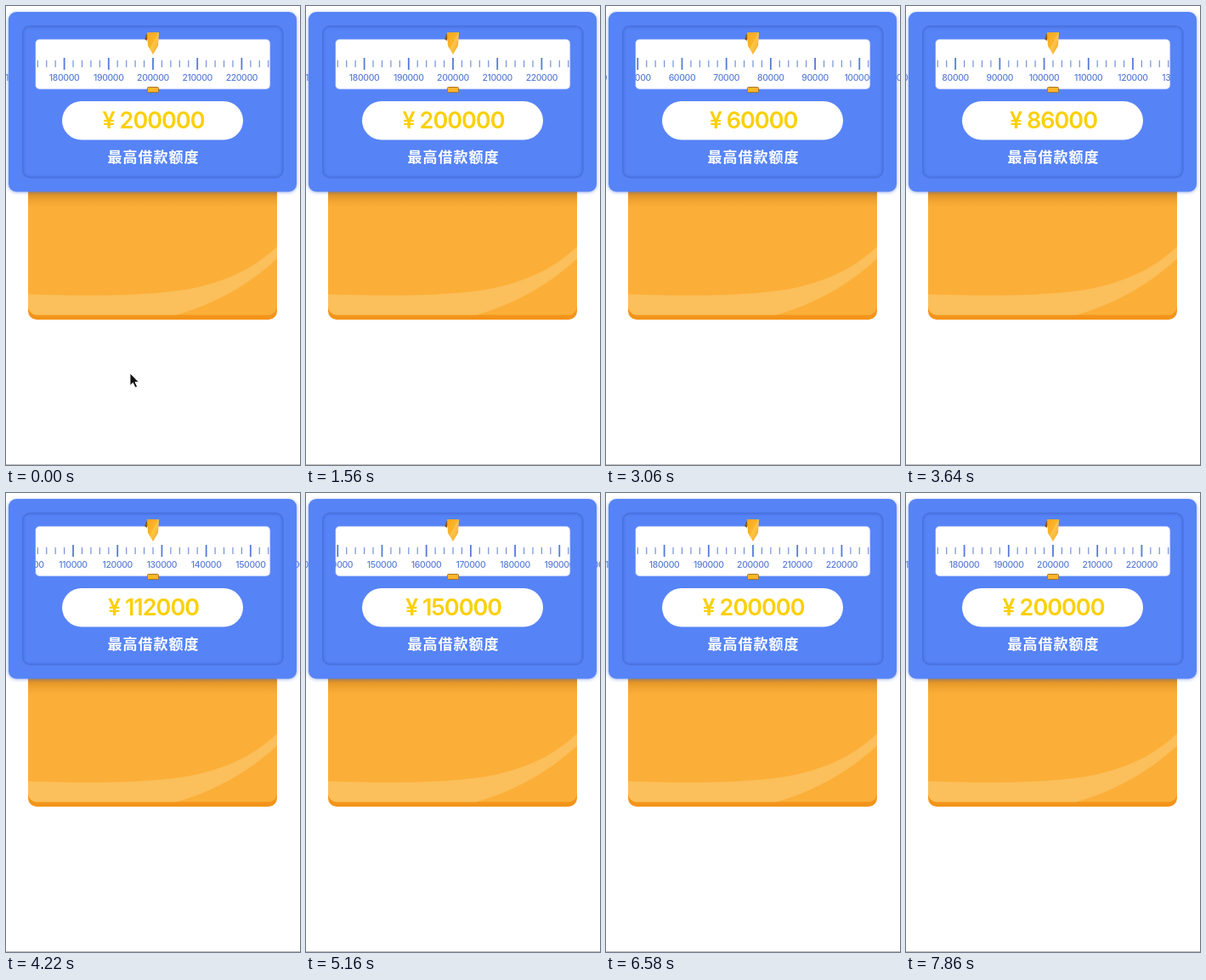
These frames come from a looping animation (346x540 px, 8 s). An HTML page:

```html
<!DOCTYPE html>
<html lang="zh">
<head>
<meta charset="utf-8">
<style>
  html, body { margin: 0; width: 100%; height: 100%; overflow: hidden; background: #fff; }
  svg { display: block; width: 346px; height: 540px; }
  text { text-anchor: middle; }
  .label { font: 500 10.4px Inter, sans-serif; letter-spacing: -.35px; fill: #5b7ed6; }
  .amount { font: 600 27px Inter, sans-serif; letter-spacing: -1px; fill: #fbd009; }
  .caption { font: 900 17px "Noto Sans CJK SC", "Noto Sans CJK", sans-serif; letter-spacing: 1px; fill: #fff; }
</style>
</head>
<body>
<svg viewBox="0 0 346 540">
  <defs>
    <linearGradient id="shade" x2="0" y2="1">
      <stop offset="0" stop-color="#b96c10" stop-opacity=".75"/>
      <stop offset=".45" stop-color="#c97a16" stop-opacity=".35"/>
      <stop offset="1" stop-color="#d98a20" stop-opacity="0"/>
    </linearGradient>
    <linearGradient id="gold" x2="1" y2="1">
      <stop offset="0" stop-color="#f8a71c"/>
      <stop offset=".48" stop-color="#fbb52c"/>
      <stop offset=".5" stop-color="#fcc64e"/>
      <stop offset="1" stop-color="#f5a51c"/>
    </linearGradient>
    <filter id="glow" x="-10%" y="-10%" width="120%" height="120%"><feGaussianBlur stdDeviation="2.2"/></filter>
    <filter id="soft" x="-10%" y="-10%" width="120%" height="120%"><feGaussianBlur stdDeviation="1.8"/></filter>
    <clipPath id="recess"><rect x="19" y="23" width="307.500" height="179.500" rx="9"/></clipPath>
    <clipPath id="card"><rect x="26" y="200" width="293" height="163.500" rx="10"/></clipPath>
    <clipPath id="view">
      <rect y="30" width="3" height="70"/>
      <rect x="34.500" y="39" width="276.500" height="59" rx="5"/>
      <rect x="342" y="30" width="4" height="70"/>
    </clipPath>
  </defs>

  <rect x="26" y="200" width="293" height="169" rx="10" fill="#f3941a"/>
  <g clip-path="url(#card)">
    <rect x="26" y="200" width="293" height="164" fill="#fbaf38"/>
    <path d="M26 339C105 342 178 341 225 331C268 321 296 305 319 283V297C286 328 247 350 199 364H26Z" fill="#fbbf5b"/>
    <rect x="26" y="216" width="293" height="21" fill="url(#shade)"/>
  </g>

  <rect x="3" y="8" width="339" height="211" rx="9" fill="#4a70d8" opacity=".6" filter="url(#glow)"/>
  <rect x="3" y="7" width="339" height="211.500" rx="9" fill="#5683f6"/>
  <g clip-path="url(#recess)">
    <rect x="18.500" y="22.500" width="308.500" height="180.500" rx="9" fill="none" stroke="#3c62c8" stroke-width="4" opacity=".75" filter="url(#soft)"/>
  </g>
  <rect x="34.500" y="39" width="276.500" height="59" rx="5" fill="#fff" stroke="#7197f8" stroke-width=".8"/>
  <g clip-path="url(#view)"><g id="ruler"></g></g>

  <path d="M163 39L166 32V41Z" fill="#875a1c"/>
  <path d="M166 31H180L179 47L173 57L167 47Z" fill="url(#gold)"/>
  <rect x="166.500" y="95.500" width="13" height="6" rx="1" fill="#fcb42c" stroke="#a9762a"/>

  <rect x="66" y="112" width="213" height="45.500" rx="22.750" fill="#fff"/>
  <text id="amount" class="amount" x="173.500" y="144"></text>
  <text class="caption" x="173.500" y="184">最高借款额度</text>

  <path id="cursor" d="M0 0V14.500L3.400 11.400L6 17L8.600 15.800L6 10.500H10.300Z" fill="#111" stroke="#fff" stroke-width=".9"/>
  <path d="M0 539.500H346" stroke="#bdbdbd"/>
</svg>
<script>
const LOOP = 8000, MAX = 200000, STEP = 2000, LEAD = 16000;
const START_BEAT = 42, START = 12000;
const GAP = 10.44;
const get = id => document.getElementById(id);
const ruler = get('ruler'), amount = get('amount'), cursor = get('cursor');

function add(tag, attrs, text = '') {
  const el = document.createElementNS('http://www.w3.org/2000/svg', tag);
  for (const key in attrs) el.setAttribute(key, attrs[key]);
  el.textContent = text;
  ruler.append(el);
}

for (let v = 0; v <= 226000; v += STEP) {
  const x = v / STEP * GAP, major = v % 10000 === 0;
  add('path', {
    d: major ? `M${x} 61V75` : `M${x} 64V72`,
    stroke: major ? '#557bd8' : '#7292dc',
    'stroke-width': major ? 1.8 : 1.2
  });
  if (major) add('text', { class: 'label', x, y: 88 }, v);
}

// Three beats every 140 ms: two short ones, then a long hold.
function beatAt(t) {
  const u = t + 20;
  return 3 * Math.floor(u / 140) + Math.min(2, Math.floor(u % 140 / 20));
}

function draw() {
  const beat = beatAt(performance.now() % LOOP);
  const value = beat < START_BEAT ? MAX : Math.min(MAX, START + STEP * (beat - START_BEAT));
  const mark = Math.min(MAX, value + LEAD);
  const p = Math.min(1, (beat - 1) / 11);

  amount.textContent = '¥ ' + value;
  ruler.setAttribute('transform', `translate(${173 - mark / STEP * GAP} 0)`);
  cursor.setAttribute('transform', `translate(${146 + 205 * p * p} ${432 - 50 * p})`);
  cursor.setAttribute('visibility', p < 1 ? 'visible' : 'hidden');
  requestAnimationFrame(draw);
}
draw();
</script>
</body>
</html>
```
